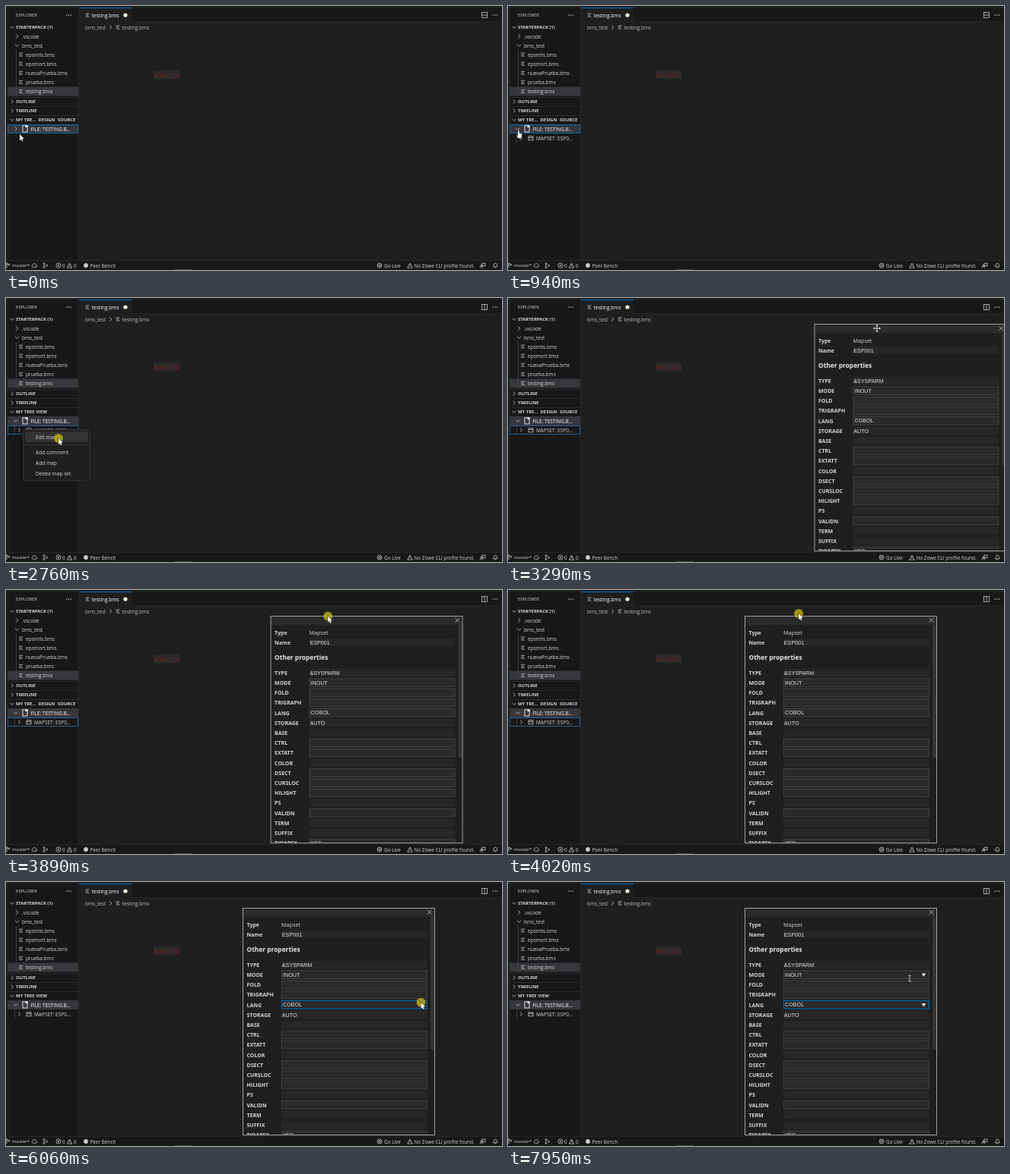
An HTML page with a canvas that plays this animation: 652 by 348 pixels, repeating every 8 s.

```html
<!DOCTYPE html>
<html lang="en">
<head>
<meta charset="utf-8">
<title>Map editor</title>
<style>
html, body { margin: 0; width: 100%; height: 100%; overflow: hidden; background: #1f1f1f; }
canvas { display: block; width: 652px; height: 348px; }
</style>
</head>
<body>
<canvas id="stage"></canvas>
<script>
const W = 652, H = 348, LOOP = 8000, TICK = 67;
const canvas = document.getElementById('stage');
const ratio = window.devicePixelRatio || 1;
canvas.width = W * ratio;
canvas.height = H * ratio;
const c = canvas.getContext('2d');
const UI = '"Open Sans", "Noto Sans", sans-serif';
const ARIAL = '"Liberation Sans", Arial, sans-serif';
const MONO = '"DejaVu Sans Mono", monospace';
const TEXT = '#d6d6d6', ICON = '#c8c8c8', EDGE = '#2b2b2b', BLUE = '#0078d4', ROW_EDGE = '#1f659b';

// Moments at which the scene changes
const EXPAND = 610, PICK = 1540, MENU = 1670, CLOSE = 2820, PANEL = 2960, FOCUS = 6060;
const DRAG = [3760, 4020];

// Pointer moves; "via" is the point reached halfway along a bent path
const START = [18, 169];
const MOVES = [
  { at: [70, 350], to: [10, 159] },
  { at: [880, 1010], to: [22, 175] },
  { at: [1740, 1870], to: [32, 179] },
  { at: [2210, 2470], to: [69, 185], via: [60, 200] },
  { at: [2890, 3290], to: [485, 40] },
  { at: DRAG, to: [382, 31] },
  { at: [4085, 4150], to: [369, 28] },
  { at: [4290, 5040], to: [404, 161], via: [380, 145] },
  { at: [5100, 5510], to: [542, 157] },
  { at: [5650, 5840], to: [545.5, 158.7] },
  { at: [6390, 6450], to: [545, 161] },
  { at: [6990, 7740], to: [518, 124], via: [390, 125] },
  { at: [7810, 7950], to: [528, 127] }
];
const PRESSES = [[540, 740], [PICK, 1740], [2690, CLOSE], [3560, 4290], [FOCUS, 6190], [6590, 6720]];

const FILES = ['epsmlis.bms', 'epsmort.bms', 'nuevaPrueba.bms', 'prueba.bms', 'testing.bms'];
const ACTIONS = ['Edit macro', 'Add comment', 'Add map', 'Delete map set'];
const PROPS = ['TYPE', 'MODE', 'FOLD', 'TRIGRAPH', 'LANG', 'STORAGE', 'BASE', 'CTRL', 'EXTATT',
  'COLOR', 'DSECT', 'CURSLOC', 'HILIGHT', 'PS', 'VALIDN', 'TERM', 'SUFFIX', 'TIOAPFX'];
const PLAIN = ['TYPE', 'STORAGE', 'BASE', 'COLOR', 'PS', 'TERM', 'SUFFIX'];
const VALUES = { TYPE: '&SYSPARM', MODE: 'INOUT', LANG: 'COBOL', STORAGE: 'AUTO', TIOAPFX: 'YES' };

const propY = i => 109 + 13.2 * i;
const actionY = i => i ? 188.8 + 14.2 * i : 183;
const during = (t, [a, b]) => t >= a && t < b;

function stepped(t, [a, b]) {
  if (t < a) return 0;
  const n = Math.round((b - a) / TICK) + 1;
  return Math.min(n, Math.floor((t - a) / (b - a) * (n - 1) + 1e-6) + 1) / n;
}

function pointerAt(t) {
  let p = START;
  for (const { at, to, via } of MOVES) {
    const s = stepped(t, at);
    if (!s) break;
    p = p.map((v, k) => {
      const bend = via ? via[k] - (v + to[k]) / 2 : 0;
      return v + (to[k] - v) * s + 4 * s * (1 - s) * bend;
    });
  }
  return p;
}

function box(x, y, w, h, color) {
  c.fillStyle = color;
  c.fillRect(x, y, w, h);
}

function frame(x, y, w, h, color = ICON, width = 1) {
  c.strokeStyle = color;
  c.lineWidth = width;
  c.strokeRect(x, y, w, h);
}

function line(pts, close = false, color = ICON, width = 0.8) {
  c.beginPath();
  pts.forEach(([x, y]) => c.lineTo(x, y));
  if (close) c.closePath();
  c.strokeStyle = color;
  c.lineWidth = width;
  c.stroke();
}

function shape(pts, fill, edge) {
  if (edge) line(pts, true, edge, 1);
  c.beginPath();
  pts.forEach(([x, y]) => c.lineTo(x, y));
  c.fillStyle = fill;
  c.fill();
}

function ring(x, y, r, from = 0, to = 7) {
  c.beginPath();
  c.arc(x, y, r, from, to);
  c.strokeStyle = ICON;
  c.lineWidth = 0.8;
  c.stroke();
}

function disc(x, y, r, color = ICON) {
  c.beginPath();
  c.arc(x, y, r, 0, 7);
  c.fillStyle = color;
  c.fill();
}

function rounded(x, y, w, h, r, color) {
  c.beginPath();
  c.roundRect(x, y, w, h, r);
  c.fillStyle = color;
  c.fill();
}

// y is the middle of the capitals
function label(s, x, y, { size = 6.5, color = TEXT, weight = 400, font = UI } = {}) {
  c.font = `${weight} ${size}px ${font}`;
  c.fillStyle = color;
  c.fillText(s, x, y + size * 0.36 + 0.3);
}

const heading = (s, x, y) => label(s, x, y, { size: 5.9, weight: 700 });

function chevron(x, y, open) {
  const pts = [[-1.3, -2.6], [1.4, 0], [-1.3, 2.6]];
  line(pts.map(([a, b]) => open ? [x + b, y + a] : [x + a, y + b]));
}

function cross(x, y, r) {
  line([[x - r, y - r], [x + r, y + r]]);
  line([[x - r, y + r], [x + r, y - r]]);
}

function listIcon(x, y) {
  for (let i = -1; i < 2; i++) box(x - 2.3, y + 2 * i - 0.4, i ? 4.8 : 3.4, 0.8, ICON);
}

function dots(x, y) {
  for (let i = -1; i < 2; i++) disc(x + 2.7 * i, y, 0.75);
}

function warning(x, y) {
  line([[x, y - 3], [x + 3.3, y + 3], [x - 3.3, y + 3]], true);
  box(x - 0.4, y - 1, 0.8, 2, ICON);
}

function drawEditor(t) {
  box(0, 0, W, H, '#1f1f1f');
  box(96, 0, W - 96, 20, '#181818');
  box(96, 20, W - 96, 0.6, EDGE);
  box(0, 1.5, W, 0.8, EDGE);
  box(96, 2, 69, 19, '#1f1f1f');
  box(96, 2, 69, 1, BLUE);
  listIcon(107, 12);
  label('testing.bms', 112.7, 12, { size: 6.6, color: '#fff' });
  disc(157, 12, 2.6, '#f3f1dc');
  frame(625.5, 8.5, 7, 7, ICON, 0.8);
  if (t < MENU) box(626, 11.6, 6, 0.8, ICON);
  else box(628.6, 9, 0.8, 6, ICON);
  dots(643, 12);
  const crumb = { color: '#bdbdbd' };
  label('bms_test', 104, 28, crumb);
  chevron(137.5, 28, false);
  listIcon(147, 28);
  label('testing.bms', 152.7, 28, crumb);
  box(194, 85, 34.5, 11, '#2c2b2b');
  [...'Hello'].forEach((s, i) =>
    label(s, 195 + i * 7, 90.7, { size: 7.5, color: '#6f1b1b', weight: 700, font: MONO }));
}

function drawTree(t, p) {
  const open = t >= EXPAND, picked = t >= PICK, away = t >= FOCUS;
  const menu = during(t, [MENU, CLOSE]);
  chevron(8, 150, true);
  if (menu || away) heading('MY TREE VIEW', 13, 150);
  else {
    heading('MY TRE...', 13, 150);
    heading('DESIGN', 42.5, 150);
    heading('SOURCE', 68, 150);
  }
  box(2, 156, 93, 12, '#37373d');
  if (!picked) frame(2.5, 156.5, 92, 11, ROW_EDGE);
  chevron(13, 162, open);
  frame(22, 157.8, 6, 8.2, '#f0f0f0', 0.9);
  box(25.5, 157.5, 3, 2.6, '#f0f0f0');
  label('FILE: TESTING.B...', 32.5, 162, { color: '#fff' });
  if (!open) return;
  if (!menu && p[0] < 95 && p[1] >= 168 && p[1] < 180) box(2, 168, 93, 12, '#2a2d2e');
  box(11, 168, 0.8, 12, '#484848');
  if (picked && !away) frame(2.5, 168.5, 92, 11, ROW_EDGE);
  chevron(17.3, 174, false);
  frame(27, 171.8, 6, 5, ICON, 0.8);
  box(27, 173, 6, 0.8, ICON);
  label('MAPSET: ESP0...', 37, 174);
}

function drawSidebar(t, p) {
  box(0, 2, 96, 333, '#181818');
  for (const x of [2, 95]) box(x, 2, 0.9, 333, EDGE);
  label('EXPLORER', 13, 12, { size: 5.8 });
  dots(82.5, 12);
  chevron(8, 28, true);
  heading('STARTERPACK (1)', 13, 28);
  ['.vscode', 'bms_test'].forEach((s, i) => {
    chevron(14.5, 40 + 12 * i, i > 0);
    label(s, 21, 40 + 12 * i);
  });
  box(2, 106.5, 93, 12, '#37373d');
  box(13, 58, 0.8, 60, '#484848');
  FILES.forEach((s, i) => {
    const y = 64 + i * 12.1;
    listIcon(19.5, y);
    label(s, 26, y);
  });
  for (let i = 0; i < 3; i++) box(2, 120 + 12 * i, 93, 1, EDGE);
  ['OUTLINE', 'TIMELINE'].forEach((s, i) => {
    chevron(8, 126 + 12 * i, false);
    heading(s, 13, 126 + 12 * i);
  });
  drawTree(t, p);
}

function drawStatus() {
  const y = 342, small = { size: 6.4 };
  box(0, 335, W, 13, '#181818');
  box(0, 335, W, 0.8, EDGE);
  box(221, 347, 23, 1, '#505050');
  // branch, cloud and graph
  ring(1, y - 2.5, 1);
  ring(3.8, y - 1, 1);
  line([[1, y + 3], [1, y - 1.5]]);
  label('master*', 8, y, { size: 6 });
  ring(35.7, y + 0.6, 1.6, 1.6, 4.5);
  ring(37.3, y - 0.6, 1.9, 3.4, 6);
  ring(39, y + 0.6, 1.6, 4.9, 7.9);
  line([[35.7, y + 2.2], [39, y + 2.2]]);
  for (let i = -1; i < 2; i++) ring(i ? 50 : 53.6, y + 2.4 * i, 1);
  line([[50, y - 1.4], [50, y + 1.4]]);

  ring(69, y, 3.1);
  cross(69, y, 1.3);
  label('0', 74, y, small);
  warning(83.5, y);
  label('0', 89, y, small);
  disc(105, y, 2.9);
  label('Peer Bench', 110.5, y, small);
  ring(491, y, 3);
  ring(491, y, 1.3);
  label('Go Live', 497, y, small);
  warning(531, y);
  label('No Zowe CLI profile found.', 536.5, y, small);
  // feedback and bell
  frame(626, y - 3, 4, 3.6, ICON, 0.8);
  ring(625, y + 0.2, 1.2);
  ring(625, y + 3.4, 2, Math.PI, 2 * Math.PI);
  ring(643.3, y - 0.8, 2, Math.PI, 2 * Math.PI);
  line([[641.3, y - 0.8], [640.6, y + 1.8], [646, y + 1.8], [645.3, y - 0.8]]);
  box(642.5, y + 2.3, 1.6, 0.9, ICON);
}

function drawMenu(p) {
  c.save();
  c.shadowColor = 'rgba(0,0,0,.5)';
  c.shadowBlur = 4 * ratio;
  rounded(22.5, 173.5, 88, 67.5, 2.5, '#1f1f1f');
  c.restore();
  c.strokeStyle = '#404040';
  c.lineWidth = 0.8;
  c.stroke();
  box(23, 193, 87, 0.8, '#404040');
  ACTIONS.forEach((s, i) => {
    const y = actionY(i);
    if (p[0] > 40 && Math.abs(p[1] - y) < 6.8) rounded(25, y - 6.7, 83, 13.6, 2, '#333435');
    label(s, 39, y, { size: 6.6 });
  });
}

function field(y, plain, text, focus, arrow) {
  box(362, y - 5.3, 191.5, 10.4, plain ? '#272727' : '#2a2a2a');
  if (!plain) frame(362.4, y - 5.3, 191, 10.6, focus ? BLUE : '#474747', 0.9);
  if (text) label(text, plain ? 362.8 : 364, y - 0.3, { size: 7.2, color: '#e2e2e2', font: ARIAL });
  if (arrow) shape([[543.6, y - 1.8], [549.4, y - 1.8], [546.5, y + 2.6]], '#e4e4e4');
}

function drawPanel(t, p) {
  const dx = 91.5 * (1 - stepped(t, DRAG));
  const px = p[0] - dx, bold = { size: 7, weight: 700 };
  c.save();
  c.translate(dx, 0);
  box(311, 34, 253, 300, '#1f1f1f');
  box(312, 35, 251, 11, '#2b2b2b');
  cross(556.7, 39.8, 2.8);
  box(558, 46, 5, 175, '#343434');
  c.save();
  c.beginPath();
  c.rect(311, 46, 253, 287);
  c.clip();
  label('Type', 316.5, 56.3, bold);
  label('Mapset', 362, 56.3, { size: 7.2 });
  label('Name', 316.5, 69, bold);
  field(69, true, 'ESP001');
  label('Other properties', 316.5, 89, { size: 8.4, weight: 700, color: '#e6e6e6' });
  PROPS.forEach((name, i) => {
    const y = propY(i), plain = PLAIN.includes(name);
    const focus = name === 'LANG' && t >= FOCUS;
    const hover = px > 362 && px < 554 && Math.abs(p[1] - y) < 5.6;
    label(name, 316.5, y, bold);
    field(y, plain, VALUES[name], focus, !plain && (hover || focus));
  });
  c.restore();
  frame(311.5, 34.5, 252, 299, '#a0a0a0');
  c.restore();
}

function cursorKind(t, [x, y]) {
  if (t < PANEL) {
    const rowsEnd = t < EXPAND ? 168 : 180;
    return t < 2210 && x < 95 && y < rowsEnd ? 'hand' : 'arrow';
  }
  if (x < (t < DRAG[0] ? 403 : 311) || y < 35) return 'arrow';
  if (y < 47) return 'move';
  const i = Math.round((y - propY(0)) / 13.2);
  const inField = i >= 0 && Math.abs(y - propY(i)) < 5.6;
  return inField && x > 362 && x < 541 ? 'beam' : 'arrow';
}

const CURSORS = {
  arrow() {
    shape([[0, 0], [0, 8.2], [1.9, 6.5], [3.1, 9.3], [4.4, 8.7], [3.2, 6], [5.7, 5.8]], '#fff', '#111');
  },
  hand() {
    shape([[-0.8, 0], [0.6, 0], [0.8, 3.4], [4.4, 4.4], [3.6, 10], [-0.4, 10], [-3, 6], [-0.9, 6.6]],
      '#fff', '#111');
  },
  beam() {
    box(-0.4, -3.8, 0.8, 7.6, '#d8d8d8');
    for (const y of [-4.2, 3.4]) box(-1.8, y, 3.6, 0.8, '#d8d8d8');
  },
  move() {
    for (let i = 0; i < 4; i++) {
      box(-0.4, -4, 0.8, 4, '#fff');
      shape([[0, -5], [1.6, -3.2], [-1.6, -3.2]], '#fff');
      c.rotate(Math.PI / 2);
    }
  }
};

function draw(t) {
  const p = pointerAt(t);
  c.setTransform(ratio, 0, 0, ratio, 0, 0);
  drawEditor(t);
  drawSidebar(t, p);
  if (t >= PANEL) drawPanel(t, p);
  drawStatus();
  if (during(t, [MENU, CLOSE])) drawMenu(p);
  if (PRESSES.some(r => during(t, r))) disc(...p, 6, 'rgba(190,178,16,.8)');
  c.translate(...p);
  CURSORS[cursorKind(t, p)]();
}

const begin = performance.now();
function tick() {
  draw((performance.now() - begin) % LOOP);
  requestAnimationFrame(tick);
}
tick();
</script>
</body>
</html>
```
